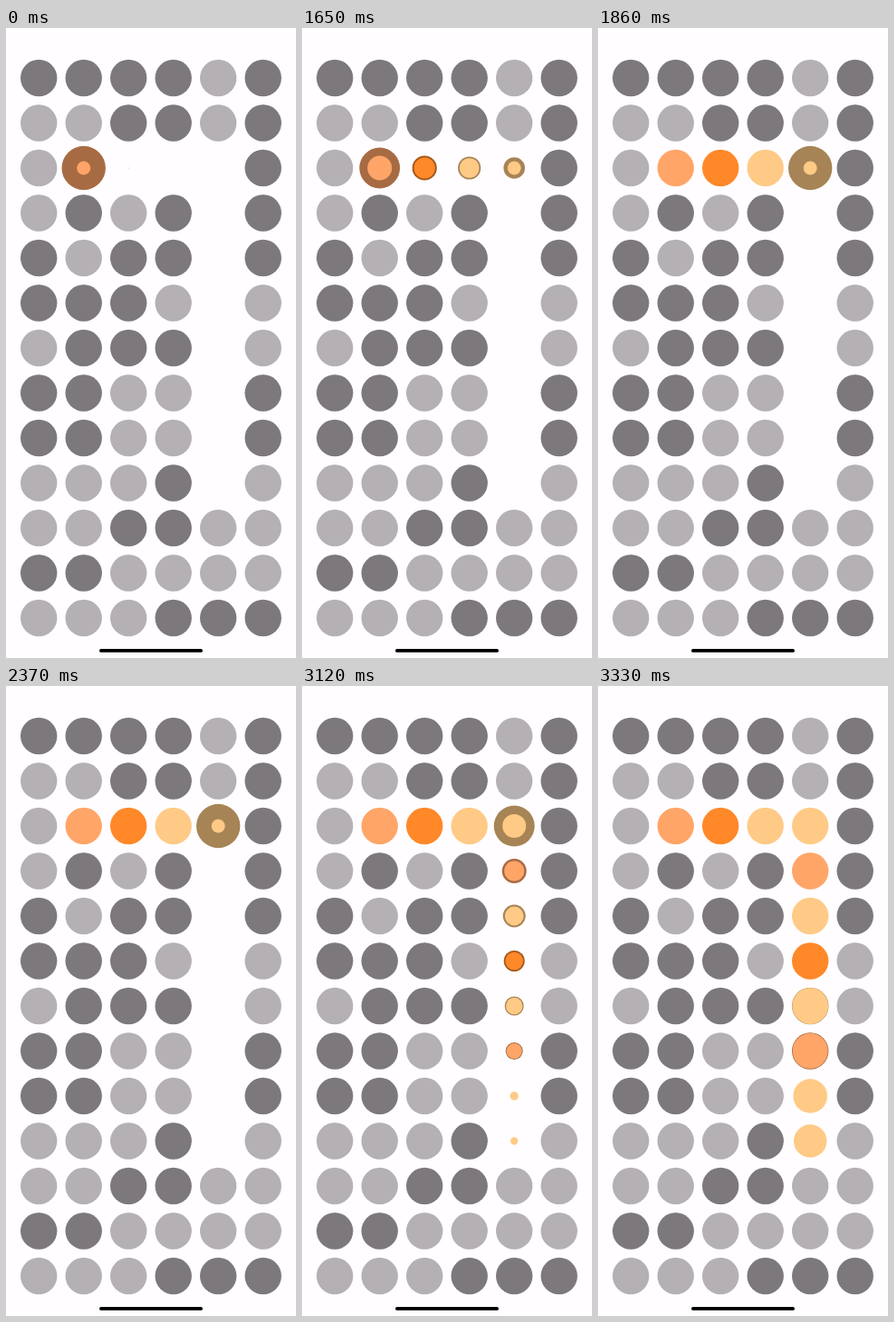
Recreate the animation shown at these times as an HTML page. Size 320 by 693 pixels, loop 3360 ms.

```html
<!DOCTYPE html>
<html lang="en">
<head>
<meta charset="utf-8">
<title>Dots</title>
<style>
  html, body { margin: 0; width: 100%; height: 100%; overflow: hidden; background: #fffdff; }
  svg { display: block; width: 100%; height: 100%; }
</style>
</head>
<body>
<svg id="stage" viewBox="0 0 320 693"></svg>
<script>
const LOOP = 3360, STEP = 30, R = 20.2;
const stage = document.getElementById('stage');

const GRID = [
  'DDDDLD', 'LLDDLD', 'L....D', 'LDLD.D', 'DLDD.D', 'DDDL.L', 'LDDD.L',
  'DDLL.D', 'DDLL.D', 'LLLD.L', 'LLDDLL', 'DDLLLL', 'LLLDDD'
];
const GREY = { D: '#7d787c', L: '#b4b0b4' };

// [fill, ring]
const PEACH = ['#ffa568', '#a76b43'];
const ORANGE = ['#ff8829', '#a4581b'];
const SAND = ['#ffca86', '#a78455'];

function add(tag, attrs) {
  const el = document.createElementNS('http://www.w3.org/2000/svg', tag);
  for (const k in attrs) el.setAttribute(k, attrs[k]);
  return stage.appendChild(el);
}

const circle = (col, row, fill, r) =>
  add('circle', { cx: 36.2 + 49.5 * col, cy: 55 + 49.5 * row, r, fill });

GRID.forEach((line, row) => [...line].forEach((c, col) => {
  if (GREY[c]) circle(col, row, GREY[c], R);
}));
add('rect', { x: 103, y: 683, width: 114, height: 3.8, rx: 1.9, fill: '#000' });

// Smooth monotone curve through (time, value) points, flat at both ends.
function curve(times, values) {
  const n = times.length;
  const rate = i => (values[i + 1] - values[i]) / (times[i + 1] - times[i]);
  const slope = values.map((_, i) => {
    if (i === 0 || i === n - 1) return 0;
    const a = rate(i - 1), b = rate(i);
    return a * b > 0 ? 2 * a * b / (a + b) : 0;
  });
  return t => {
    if (t <= times[0]) return values[0];
    if (t >= times[n - 1]) return values[n - 1];
    let i = 0;
    while (t >= times[i + 1]) i++;
    const h = times[i + 1] - times[i], u = (t - times[i]) / h, v = 1 - u;
    return v * v * (1 + 2 * u) * values[i] + u * u * (3 - 2 * u) * values[i + 1]
      + h * u * v * (v * slope[i] - u * slope[i + 1]);
  };
}

const ACROSS = [1530, 1650, 1740, 1860];
const DOWN = [2962, 3120, 3210, 3330];
const dots = [];

// Radii of ring and fill at each of the given times.
function dot(col, row, [fill, ring], times, outer, inner) {
  dots.push({
    ring: circle(col, row, ring, 0),
    fill: circle(col, row, fill, 0),
    outer: curve(times, outer),
    inner: curve(times, inner)
  });
}

dot(1, 2, PEACH, ACROSS, [24.2, 22.4, 20.6, R], [7.5, 13.5, 19.2, R]);
dot(2, 2, ORANGE, ACROSS, [0.3, 13.6, 20.3, R], [0.2, 11.6, 18.6, R]);
dot(3, 2, SAND, ACROSS, [0, 12.6, 20.2, R], [0, 10.8, 18, R]);
dot(4, 2, SAND, [...ACROSS, ...DOWN],
  [0, 11.8, 19.6, 24.2, 24.2, 22.5, 20.7, R],
  [0, 7.4, 8.6, 7.5, 7.5, 13, 18.5, R]);

[PEACH, SAND, ORANGE, SAND, PEACH].forEach((color, i) => {
  dot(4, 3 + i, color, DOWN,
    [0, 13.5 - i, 20 - 0.55 * i, 20.25],
    [0, 11 - 0.6 * i, 17.5 - 0.5 * i, i < 3 ? 20.2 : 21.1 - 0.4 * i]);
});
dot(4, 8, SAND, DOWN, [0, 0, 0, 0], [0, 4.7, 11.4, 18.8]);
dot(4, 9, SAND, DOWN, [0, 0, 0, 0], [0, 4.2, 10.5, 18.2]);

function draw(t) {
  for (const d of dots) {
    const inner = d.inner(t), outer = d.outer(t);
    d.fill.setAttribute('r', inner);
    d.ring.setAttribute('r', outer > inner + 0.08 ? outer : 0);
  }
}

const start = performance.now();
function tick() {
  const t = (performance.now() - start) % LOOP;
  draw(Math.floor((t + 1) / STEP) * STEP % LOOP);
  requestAnimationFrame(tick);
}
draw(0);
requestAnimationFrame(tick);
</script>
</body>
</html>
```
